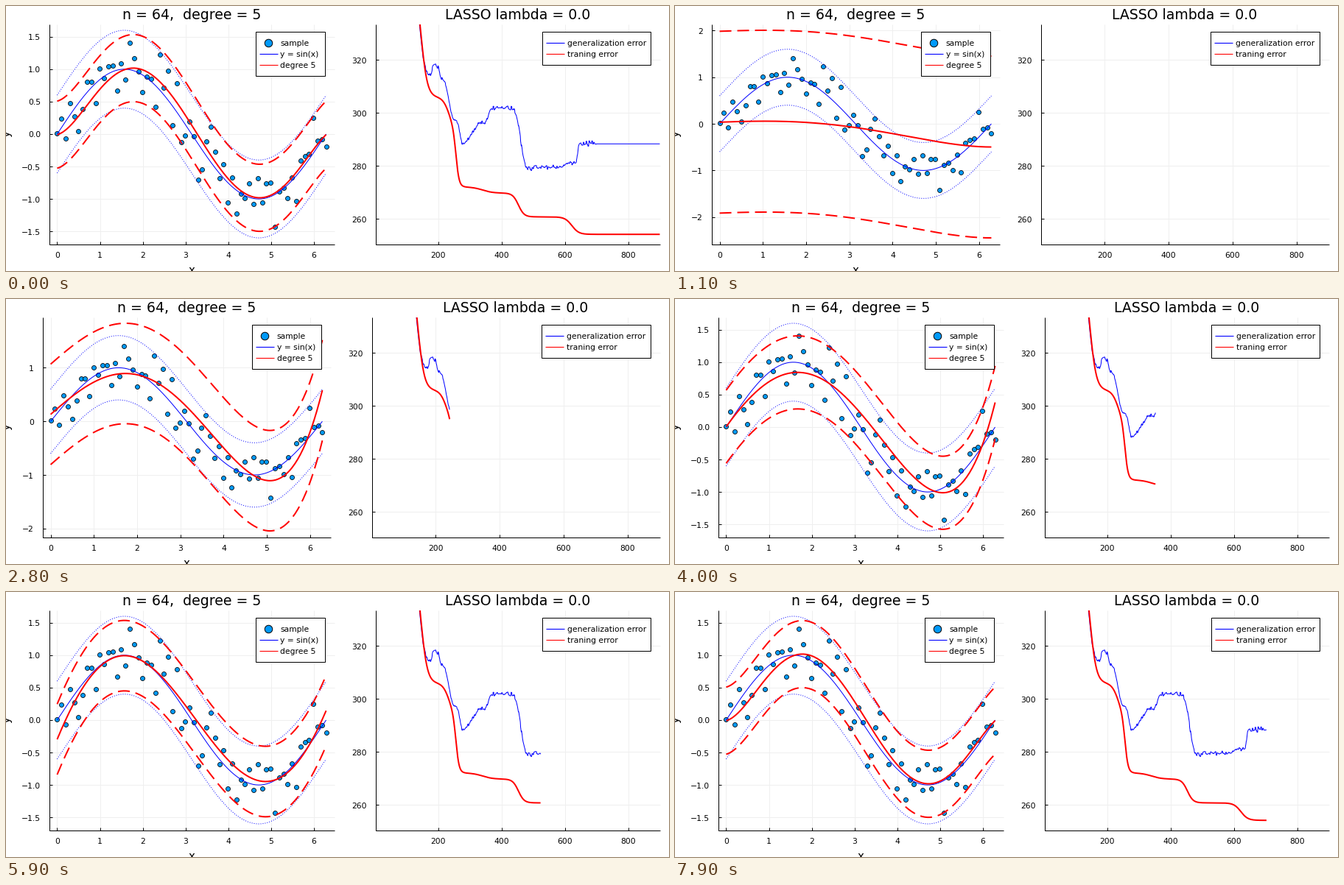
These frames come from a looping animation (900x360 px, 8 s). A matplotlib script:

```python
import matplotlib.pyplot as plt
import numpy as np
from matplotlib.animation import FuncAnimation
from matplotlib.patches import Rectangle

W, H, DPI = 900, 360, 72
FRAMES, STEP, LAST = 80, 9, 900
TOP, BOTTOM = 25, 324
TAU = 2 * np.pi
POW = np.arange(6)
BLUE, RED, DOT = "#0000ff", "#ff0000", "#009afa"

plt.rcParams["font.family"] = "DejaVu Sans"
rng = np.random.RandomState(4)

sample_x = np.linspace(0, TAU, 64)
sample_y = np.sin(sample_x) + np.clip(rng.normal(0, .27, 64), -.55, .55)

steps = np.arange(1, LAST + 1)


def descent(*drops):
    """Error from 400 down through smooth drops (size, centre, width)."""
    return 400 - sum(size / (1 + np.exp(-np.clip((steps - at) / w, -60, 60)))
                     for size, at, w in drops)


train = descent((50, 118, 6), (44, 146, 10), (12, 233, 10), (22, 255.5, 5),
                (2.3, 340, 16), (9, 453, 9), (6.6, 622, 11))
general = descent((50, 118, 6), (37, 141, 8.5), (-5, 179, 2), (5, 204, 2.5),
                  (17, 234, 6), (9, 268, 2.5), (-9.5, 302, 12),
                  (-5.5, 358, 3), (24, 460, 7), (-1.5, 497, 5),
                  (-1.6, 600, 4), (-7.2, 640, 1.5))
wobble = np.repeat(rng.normal(0, .4, LAST // 3), 3)
general += wobble * ((steps > 150) & (steps < 700))


def fit(xs, ys, flat=(1, 2)):
    """Quintic through four points, level at two of them."""
    rows = [x ** POW for x in xs]
    rows += [POW * xs[i] ** np.maximum(POW - 1, 0) for i in flat]
    return np.linalg.solve(np.array(rows, float), list(ys) + [0, 0])


# iteration, half width of the band, polynomial
KEYS = [
    (1, 2.0, np.zeros(6)),
    (91, 1.95, fit((0., 1.05, 4., TAU), (.035, .057, -.21, -.497), (1, 3))),
    (181, 1.037, fit((0., 1.78, 5.08, TAU), (.137, 1.008, -1.235, .80))),
    (244, .937, fit((0., 1.73, 5.07, TAU), (.13, .893, -1.107, .58))),
    (352, .563, fit((0., 1.67, 5.06, TAU), (.005, .843, -1.012, .38))),
    (523, .543, fit((0., 1.57, 4.87, TAU), (-.297, .993, -.947, .145))),
    (703, .517, fit((0., 1.78, 4.73, TAU), (-.009, 1.017, -.982, -.008))),
]


def model(t):
    """Band half width and coefficients, moving as the training error falls."""
    if t >= KEYS[-1][0]:
        return KEYS[-1][1:]
    i = max(j for j, key in enumerate(KEYS) if key[0] <= t)
    (t0, w0, c0), (t1, w1, c1) = KEYS[i:i + 2]
    e0, e, e1 = (train[s - 1] for s in (t0, t, t1))
    p = .7 * (e - e0) / (e1 - e0) + .3 * (t - t0) / (t1 - t0)
    return w0 + (w1 - w0) * p, c0 + (c1 - c0) * p


fig = plt.figure(figsize=(W / DPI, H / DPI), dpi=DPI, facecolor="white")
ax = fig.add_axes([0, 0, 1, 1])


def label(x, y, s, size, ha="center", **kw):
    ax.text(x, y, s, fontsize=size, ha=ha, va="baseline", zorder=9, **kw)


def stroke(x, y, color="black", lw=1., **kw):
    kw.setdefault("solid_capstyle", "butt")
    return ax.plot(x, y, color=color, lw=lw, **kw)[0]


class Panel:
    def __init__(self, left, right, xlim, ylim):
        self.left, self.right, self.xlim, self.ylim = left, right, xlim, ylim
        self.clip = Rectangle((left, TOP), right - left, BOTTOM - TOP,
                              transform=ax.transData)

    def px(self, x):
        a, b = self.xlim
        return self.left + (np.asarray(x) - a) / (b - a) * (self.right - self.left)

    def py(self, y):
        a, b = self.ylim
        return BOTTOM - (np.asarray(y) - a) / (b - a) * (BOTTOM - TOP)

    def line(self, x, y, color, lw=1., **kw):
        stroke(self.px(x), self.py(y), color, lw, **kw).set_clip_path(self.clip)

    def frame(self, title, xticks, yticks, fmt):
        left, right = self.left, self.right
        for v in xticks:
            x = self.px(v)
            stroke([x, x], [TOP, BOTTOM], "#efefef", zorder=0)
            stroke([x, x], [BOTTOM, BOTTOM - 4], zorder=1)
            label(x, 342.5, f"{v:d}", 10.8)
        for v in yticks:
            y = self.py(v)
            stroke([left, right], [y, y], "#efefef", zorder=0)
            stroke([left, left + 4], [y, y], zorder=1)
            label(left - 11.5, y + 4.5, fmt.format(v).replace("-", "\u2212"),
                  10.8, "right")
        stroke([left, left, right], [TOP, BOTTOM, BOTTOM], zorder=1)
        label((left + right) / 2, 18.5, title, 18.9)


def legend(left, right, rows):
    ax.add_patch(Rectangle((left, 35), right - left, 15 * (len(rows) + 1),
                           fc="white", ec="black", lw=1, zorder=7))
    for i, (name, color, lined) in enumerate(rows):
        y = 50 + 15.2 * i
        if lined:
            stroke([left + 5, left + 30], [y, y], color, 1.1, zorder=8)
        else:
            ax.plot(left + 17.5, y, "o", ms=10.5, mfc=color, mec="black",
                    mew=1, zorder=8)
        label(left + 34, y + 4.5, name, 10.7, "left")


def draw_fit(t):
    """Draw the left panel; returns True when it needs wide tick labels."""
    width, coef = model(t)
    x = np.linspace(0, TAU, 200)
    y = np.polyval(coef[::-1], x)
    low = min(-1.6, (y - width).min())
    high = max(1.6, (y + width).max())
    pad = .03 * (high - low)
    low, high = low - pad, high + pad
    wide = low > -2
    gap = .5 if wide else 1
    ticks = np.arange(np.ceil(low / gap), np.floor(high / gap) + 1) * gap + 0.

    left, right = (59, 446) if wide else (50, 441)
    p = Panel(left, right, (-.03 * TAU, 1.03 * TAU), (low, high))
    p.frame("n = 64,  degree = 5", range(7), ticks,
            "{:.1f}" if wide else "{:.0f}")
    label((left + right) / 2, 364.5, "x", 15)
    label(5.5, 174.5, "y", 15, rotation=90, rotation_mode="anchor")

    ax.plot(p.px(sample_x), p.py(sample_y), "o", ms=6, mfc=DOT, mec="black",
            mew=.8, zorder=3)
    p.line(x, np.sin(x), BLUE, zorder=4)
    for s in (-.6, .6):
        p.line(x, np.sin(x) + s, BLUE, linestyle=(0, (1, 2)),
               dash_capstyle="butt", zorder=4)
    p.line(x, y, RED, 2, zorder=5)
    for s in (-width, width):
        p.line(x, y + s, RED, 2, linestyle=(0, (8, 4)),
               dash_capstyle="butt", zorder=5)
    legend(right - 107, right - 13,
           [("sample", DOT, False), ("y = sin(x)", BLUE, True),
            ("degree 5", RED, True)])
    return wide


def draw_errors(t, wide):
    p = Panel(502 if wide else 497, 888, (1, 900), (250.4, 333.6))
    p.frame("LASSO lambda = 0.0", range(200, 801, 200),
            range(260, 321, 20), "{:d}")
    p.line(steps[:t], general[:t], BLUE, zorder=4)
    p.line(steps[:t], train[:t], RED, 2, zorder=5)
    legend(728.5 if wide else 727.5, 875,
           [("generalization error", BLUE, True), ("traning error", RED, True)])


def draw(k):
    ax.clear()
    ax.set_axis_off()
    # strokes end on the pixel before their coordinate
    ax.set_xlim(.5, W + .5)
    ax.set_ylim(H + .5, .5)
    # the loop opens on the finished run, then starts over
    t = 1 + STEP * (k - 1) if k else LAST
    draw_errors(t, draw_fit(t))
    return []


anim = FuncAnimation(fig, draw, frames=FRAMES, interval=100, repeat=True,
                     repeat_delay=0, blit=False)
plt.show()
```
